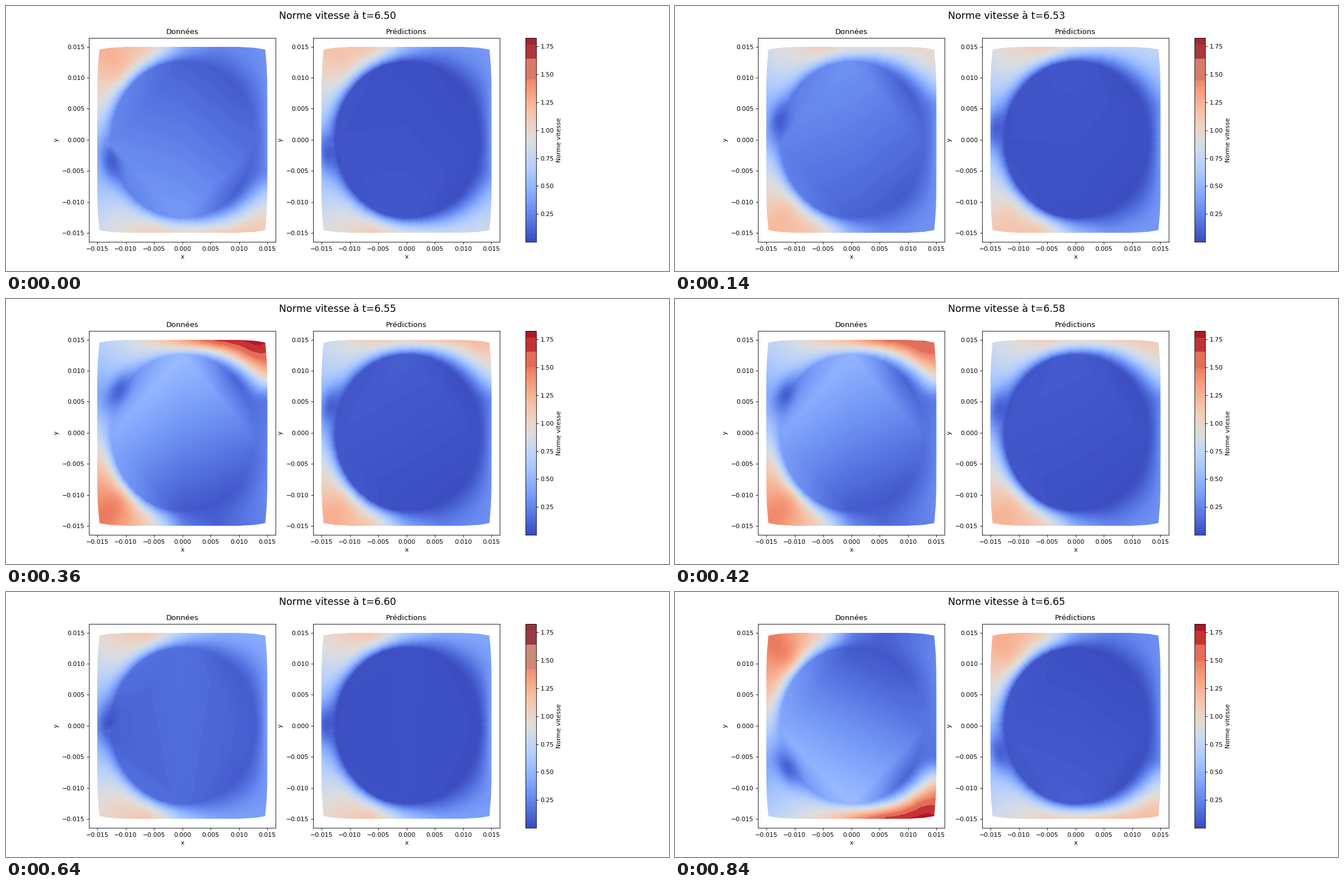
A matplotlib script for the animation above (0.98 s loop, 1183 px wide and 473 px high).

```python
import numpy as np
import matplotlib.pyplot as plt
from matplotlib.animation import FuncAnimation
from matplotlib.colors import ListedColormap
from matplotlib.patches import Polygon

W, H, DPI = 1183, 473, 80
K = 0.986                      # overall scale of type and lines
VMIN, VMAX, LEVELS = 0.002, 1.825, 200
STEPS = 7
R = 12.6                       # cylinder radius in mm

plt.rcParams.update({
    "font.family": "DejaVu Sans", "font.size": 10 * K,
    "axes.linewidth": 0.8 * K,
    "xtick.major.width": 0.8 * K, "ytick.major.width": 0.8 * K,
    "xtick.major.size": 3.5 * K, "ytick.major.size": 3.5 * K,
})

# Speed (hundredths) against angle from downstream: a calm symmetric flow,
# and the two sides of a fully deflected one.
EDGE_AT = np.array([0, 22, 34, 45, 68, 90, 112, 135, 158, 180])
EDGE = dict(calm=[42, 38, 35, 38, 40, 62, 116, 98, 62, 30],
            jet=[22, 18, 132, 184, 170, 130, 99, 68, 40, 72],
            away=[22, 25, 28, 24, 8, 22, 106, 154, 118, 72])
RING_AT = np.arange(0, 181, 45)
RING = dict(calm=[8, 7, 14, 16, 8],
            jet=[20, 9, 54, 30, 44],
            away=[20, 6, 6, 32, 44])

x, y = np.meshgrid(np.linspace(-15.1, 15.1, 305), np.linspace(-15.1, 15.1, 335))
r = np.hypot(x, y) + 1e-9
theta = np.degrees(np.arctan2(y, x)) % 360
FINE = np.arange(0, 360, 0.5)


def deflect(at, flow, q):
    """Angles and speeds round the circle; the jet is low when q > 0."""
    calm, jet, away = (np.array(flow[n]) for n in ("calm", "jet", "away"))
    up, down = (away, jet) if q > 0 else (jet, away)
    up, down = (calm + abs(q) * (side - calm) for side in (up, down))
    return np.r_[at, 360 - at[-2:0:-1]], np.r_[up, down[-2:0:-1]]


def around(knots, values, sigma):
    """Smooth periodic curve through knots, read at every grid angle."""
    v = np.interp(FINE, knots, values, period=360)
    n = np.arange(len(FINE) // 2 + 1)
    blur = np.exp(-0.5 * (np.radians(sigma) * n) ** 2)
    v = np.fft.irfft(np.fft.rfft(v) * blur, len(FINE))
    return np.interp(theta, FINE, v, period=360)


# Boundary layer: thin upstream, thicker and softer in the wake.
wake = np.maximum(x / r, 0)
reach, power = 2.1 + 3.2 * wake, 1 + 0.7 * wake
rough = np.random.default_rng(4).normal(0, 0.035, 450)
gap = r - R + np.interp(theta, np.arange(450) * 0.8, rough, period=360)
room = 15 * r / np.maximum(abs(x), abs(y)) - R


def rise(d):
    return np.tanh((np.maximum(d, 0) / reach) ** power)


layer = np.clip(rise(gap) / rise(room), 0, 1.02)

# Four-cornered facet inside the cylinder, with side corners a bit low.
h = abs(x) / R
ys = (y + 0.8 * h) / R
k = h + abs(ys) + 1e-9
bulge = np.clip((k - 1) / np.maximum(k * R / r - 1, 1e-3), 0, 1)


def slow_spot(angle, radius):
    """Stagnation patch, stretched along the cylinder wall."""
    a = np.radians(angle)
    out = x * np.cos(a) + y * np.sin(a) - radius
    along = y * np.cos(a) - x * np.sin(a)
    spot = np.exp(-0.5 * ((out / 1.2) ** 2 + (along / 2.1) ** 2))
    return spot * np.clip((k - 1) / 0.1, 0, 1)


def field(q, inner, stag_r):
    knots, ring = deflect(RING_AT, RING, q)
    ring = ring * inner
    rim = around(knots, ring, 7)
    outer = around(*deflect(EDGE_AT, EDGE, q), 3)
    right, top, left, bottom = ring[::2]
    side = np.where(x < 0, left, right)
    facet = h * side + (1 - h + ys) / 2 * top + (1 - h - ys) / 2 * bottom
    chord = (h * side + abs(ys) * np.where(ys > 0, top, bottom)) / k
    inside = np.where(k < 1, facet, chord + (rim - chord) * bulge)
    v = np.where(r < R, inside, rim + (outer - rim) * layer)
    v = v * (1 - 0.75 * slow_spot(180 + 31 * q, stag_r))
    return np.clip(v / 100, VMIN, VMAX)


def scale(q):
    """Cool to warm, with flat hot steps that dull as the flow calms."""
    colors = plt.get_cmap("coolwarm")(np.linspace(0, 1, LEVELS))
    speeds = np.linspace(VMIN, VMAX, LEVELS)
    steps = [(1.41 + 0.09 * abs(q), (205, 138, 122), (229, 108, 88)),
             (1.64, (152, 60, 70), (196, 50, 52)),
             (1.77, (150, 54, 62), (178, 22, 42))]
    for start, dull, hot in steps:
        mix = np.array(dull) + abs(q) * (np.array(hot) - dull)
        colors[speeds >= start, :3] = mix / 255
    return ListedColormap(colors)


def sway(i):
    """Vortex shedding: one full swing per loop."""
    return np.clip(1.1 * np.cos(np.radians(62 + 360 * i / STEPS)), -1, 1)


swings = [sway(i) for i in range(STEPS)]
data = [field(q, 1, 13.2) for q in swings]
pred = [field(0.57 * q, 0.22, 14.2) for q in swings]
cmaps = [scale(q) for q in swings]

quarter = np.array([(15, 3.3), (14.98, 9), (14.88, 11.7),
                    (14.62, 14.5), (12.8, 14.78), (9.9, 14.93)])
half = np.vstack([quarter, quarter[::-1] * [-1, 1]])
hull = np.vstack([half, -half]) * 1.002 / 1000

fig = plt.figure(figsize=(W / DPI, H / DPI), dpi=DPI, facecolor="white")
title = fig.suptitle("", fontsize=16 * K)
ticks = np.arange(-3, 4) * 0.005


def panel(left, name):
    ax = fig.add_axes([left / W, 0.11, 333.4 / W, 0.77])
    im = ax.imshow(data[0], origin="lower", aspect="auto", vmin=VMIN, vmax=VMAX,
                   extent=(-0.0151, 0.0151, -0.0151, 0.0151), interpolation="nearest")
    im.set_clip_path(Polygon(hull, transform=ax.transData))
    ax.set(xlim=(-0.0165, 0.0165), ylim=(-0.01642, 0.01642),
           xticks=ticks, yticks=ticks, xlabel="x", ylabel="y")
    ax.set_title(name, fontsize=12 * K)
    return im


im_data = panel(147.9, "Données")
im_pred = panel(547.9, "Prédictions")

cax = fig.add_axes([927.4 / W, 0.11, 18.2 / W, 0.77])
bar = cax.imshow(np.linspace(VMIN, VMAX, LEVELS)[:, None], origin="lower",
                 aspect="auto", extent=(0, 1, VMIN, VMAX), interpolation="nearest")
cax.set_xticks([])
cax.set_yticks(np.arange(1, 8) * 0.25)
cax.yaxis.tick_right()
cax.yaxis.set_label_position("right")
cax.yaxis.set_major_formatter("{x:.2f}")
cax.set_ylabel("Norme vitesse")


def draw(i):
    im_data.set_data(data[i])
    im_pred.set_data(pred[i])
    for im in (im_data, im_pred, bar):
        im.set_cmap(cmaps[i])
    title.set_text(f"Norme vitesse à t={6.5 + 0.025 * i + 1e-6:.2f}")
    return im_data, im_pred, bar, title


anim = FuncAnimation(fig, draw, frames=STEPS, interval=140, repeat=True,
                     repeat_delay=0, blit=False)
plt.show()
```
